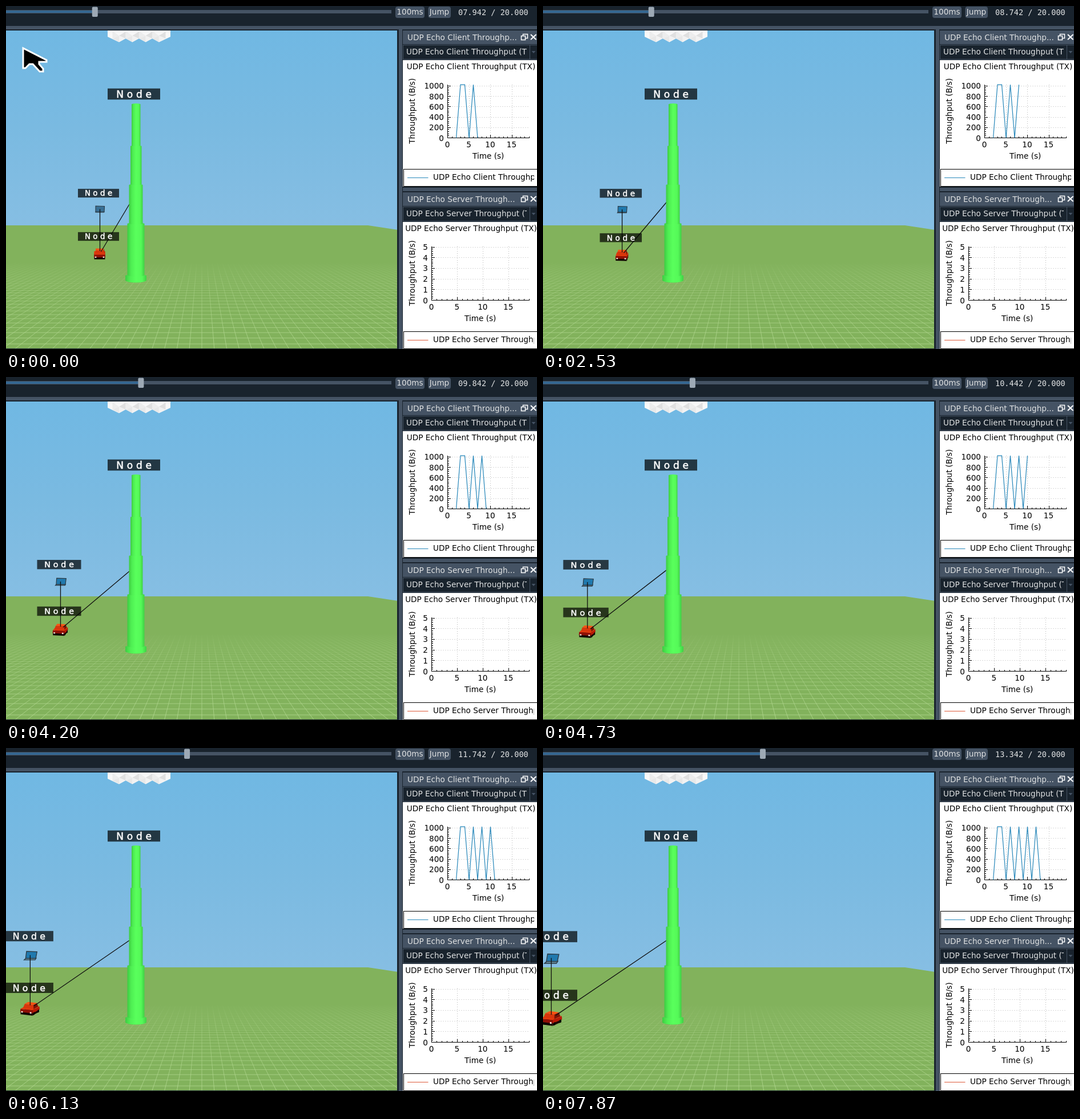
Write an HTML page with a canvas that moves like this. It is 930 px wide and 602 px high and loops after 8000 ms.

```html
<!DOCTYPE html>
<html lang="en">
<head>
<meta charset="utf-8">
<title>Network simulation playback</title>
<style>
html, body { margin: 0; width: 100%; height: 100%; overflow: hidden; background: #19232d; }
canvas { display: block; }
</style>
</head>
<body>
<canvas id="stage" width="930" height="602"></canvas>
<script>
const ctx = document.getElementById('stage').getContext('2d');
const LOOP = 8000, TICK = 200 / 3;
const DARK = '#19232d', SLATE = '#455364', PALE = '#dfe1e2';
const SANS = '13.6px "DejaVu Sans", sans-serif';
const MONO = '13.6px "DejaVu Sans Mono", monospace';

// Playback progress: [tick, tenths of a second simulated]
const PROGRESS = [[29, 0], [30, 1], [35, 6], [37, 7], [38, 8], [42, 9], [44, 10], [46, 11],
  [50, 12], [56, 16], [58, 17], [63, 19], [68, 23], [70, 24], [71, 25], [73, 26], [74, 27],
  [76, 28], [80, 30], [85, 35], [88, 36], [98, 41], [100, 42], [101, 43], [103, 44],
  [107, 47], [109, 48], [116, 54], [118, 54.6]];

// Vehicle path: tenths, label right, label width, x, laptop y, lower label y, car y, yaw, link y
const PATH = [
  [1, 198, 72, 164.5, 356.5, 404.5, 435, 0, 348],
  [12, 158.5, 74.5, 123.5, 357.5, 408, 439, 0.14, 343],
  [19, 131.5, 77, 95.5, 359, 411, 443.5, 0.22, 341],
  [30, 102.5, 81.5, 64.5, 361, 415.5, 450, 0.33, 338],
  [44, 70.5, 88, 28, 365.5, 425.5, 463.5, 0.48, 338],
  [54.6, 60, 92, 14.5, 368.5, 434, 474.5, 0.52, 338]];

function rect(x, y, w, h, color) {
  ctx.fillStyle = color;
  ctx.fillRect(x, y, w, h);
}

function poly(points, fill, stroke, width = 1) {
  ctx.beginPath();
  points.forEach(([x, y]) => ctx.lineTo(x, y));
  ctx.closePath();
  if (fill) { ctx.fillStyle = fill; ctx.fill(); }
  if (stroke) { ctx.strokeStyle = stroke; ctx.lineWidth = width; ctx.stroke(); }
}

function line(x1, y1, x2, y2, color, width = 1) {
  ctx.strokeStyle = color;
  ctx.lineWidth = width;
  ctx.beginPath();
  ctx.moveTo(x1, y1);
  ctx.lineTo(x2, y2);
  ctx.stroke();
}

function text(str, x, y, color, align = 'left', font = SANS) {
  ctx.font = font;
  ctx.fillStyle = color;
  ctx.textAlign = align;
  ctx.fillText(str, x, y);
}

function clipped(x, y, w, h, draw) {
  ctx.save();
  ctx.beginPath();
  ctx.rect(x, y, w, h);
  ctx.clip();
  draw();
  ctx.restore();
}

function progressAt(tick) {
  if (tick < 30) return 0;
  const i = PROGRESS.findIndex(p => p[0] > tick);
  if (i < 0) return PROGRESS[PROGRESS.length - 1][1];
  const [t0, a] = PROGRESS[i - 1], [t1, b] = PROGRESS[i];
  return b - a <= 1 ? a : a + (b - a) * (tick - t0) / (t1 - t0);
}

// Cubic Hermite through the path rows
function poseAt(u) {
  const last = PATH.length - 1;
  u = Math.min(Math.max(u, PATH[0][0]), PATH[last][0]);
  let i = 0;
  while (i < last - 1 && u > PATH[i + 1][0]) i++;
  const p = PATH[i], q = PATH[i + 1], span = q[0] - p[0], s = (u - p[0]) / span;
  const slope = (j, c) => {
    const a = PATH[Math.max(j - 1, 0)], b = PATH[Math.min(j + 1, last)];
    return (b[c] - a[c]) / (b[0] - a[0]);
  };
  const [, right, width, x, laptopY, labelY, carY, yaw, linkY] = p.map((v, c) =>
    v + (q[c] - v) * s * s * (3 - 2 * s)
    + span * s * (1 - s) * ((1 - s) * slope(i, c) - s * slope(i + 1, c)));
  return { right, width, x, laptopY, labelY, carY, yaw, linkY };
}

function drawGround() {
  const sky = ctx.createLinearGradient(0, 42, 0, 388);
  sky.addColorStop(0, '#70b8e3');
  sky.addColorStop(0.5, '#7abae1');
  sky.addColorStop(1, '#86bee3');
  rect(0, 42, 686, 560, sky);
  poly([[0, 385], [634, 385], [686, 393], [686, 602], [0, 602]], '#82b25c');

  const mesh = ctx.createLinearGradient(0, 450, 0, 602);
  mesh.addColorStop(0, 'rgba(176,214,142,0)');
  mesh.addColorStop(0.25, 'rgba(176,214,142,0.4)');
  mesh.addColorStop(1, 'rgba(176,214,142,0.85)');
  const vx = 343, vy = 345, focal = 485, cell = 0.085;
  for (let z = 1.87; z < 4.7; z += cell) line(0, vy + focal / z, 686, vy + focal / z, mesh);
  for (let k = -42; k <= 42; k++)
    line(vx + k * cell * 105, vy + 105, vx + k * cell * 257, vy + 257, mesh);
}

function drawCloud() {
  const rim = [[178, 42], [178, 54]];
  for (let i = 0; i < 4; i++) {
    const x = 198 + i * 23.3;
    rim.push([x, 63.5]);
    if (i < 3) rim.push([x + 11.6, 57]);
  }
  poly([...rim, [288, 54], [288, 42]], '#f8f8f8');
  for (let i = 0; i < 4; i++) {
    const x = 198 + i * 23.3;
    poly([[x - 11.6, 57], [x, 52], [x, 63]], '#e8e8e8');
    poly([[x, 52], [x + 11.6, 57], [x, 63]], '#f2f2f2');
    poly([[x - 11.6, 44], [x, 52], [x - 11.6, 57]], '#ededed');
    poly([[x, 52], [x + 11.6, 45], [x + 11.6, 57]], '#e0e0e0');
  }
}

function drawTower() {
  const part = (x1, x2, y1, y2, bow) => {
    const g = ctx.createLinearGradient(x1, 0, x2, 0);
    g.addColorStop(0, '#3ecb43');
    g.addColorStop(0.22, '#4eee52');
    g.addColorStop(0.5, '#59ff5c');
    g.addColorStop(0.8, '#55f958');
    g.addColorStop(1, '#40d045');
    const mid = (x1 + x2) / 2, r = (x2 - x1) / 2;
    ctx.fillStyle = g;
    ctx.beginPath();
    ctx.ellipse(mid, y1 + 1, r, 1.5, 0, Math.PI, 0);
    ctx.ellipse(mid, y2 - bow, r, bow, 0, 0, Math.PI);
    ctx.fill();
  };
  part(209, 246, 472, 485.5, 4.5);
  part(212.5, 242.5, 381, 475, 3);
  part(215.5, 239.5, 313, 383, 1);
  part(218, 237.5, 245, 314, 1);
  part(220, 235.5, 171.5, 246, 1);
}

function drawLabel(x, cy, w) {
  const h = w * 0.212, size = w * 0.185;
  const left = x + w * 0.165, base = cy + size * 0.37;
  rect(x, cy - h / 2, w, h, 'rgba(0,0,0,0.7)');
  ctx.letterSpacing = w * 0.063 + 'px';
  text('Node', left, base, '#fff', 'left', size + 'px "DejaVu Sans", sans-serif');
  ctx.strokeStyle = '#fff';
  ctx.lineWidth = 0.5;
  ctx.strokeText('Node', left, base);
  ctx.letterSpacing = '0px';
}

function drawLaptop(x, y, scale, yaw) {
  ctx.save();
  ctx.translate(x + yaw * 4, y);
  ctx.scale(scale, scale);
  const skew = yaw * 1.5, drop = 5.5 + yaw * 4;
  poly([[-7.5, 4.5], [7.5, 4.5], [7.5 - yaw * 4, drop], [-8 - yaw * 6, drop]],
    '#5f8395', '#26323a', 1);
  poly([[-7.5 + skew, -5.5], [8 + skew, -5], [7.5 - skew, 4.8], [-7.5 - skew, 4.5]],
    yaw < 0.05 ? '#386f94' : '#2079ae', '#2c3a44', 1.1);
  ctx.restore();
}

// Blocky car, seen from the front and turning to its right
function drawCar(x, y, scale, yaw) {
  const c = Math.cos(yaw), s = Math.sin(yaw);
  const at = ([a, l, h]) => [x + scale * (a * c - l * s),
    y + scale * ((a * s + l * c) * 0.25 - h + 6.5)];
  const face = (color, ...pts) => poly(pts.map(at), color);
  const block = (w, back, front, low, high, taper, top, nose, side) => {
    const t = w - taper, b = back + taper, f = front - taper * 2;
    face(side, [w, back, low], [w, front, low], [t, f, high], [t, b, high]);
    face(nose, [-w, front, low], [w, front, low], [t, f, high], [-t, f, high]);
    face(top, [-t, b, high], [t, b, high], [t, f, high], [-t, f, high]);
  };
  block(9.5, -12, 12.5, 0, 4, 0, '#120503', '#120503', '#1a0603');
  block(10, -13, 13, 3.5, 8, 0.3, '#e63a0c', '#8f1006', '#b81907');
  for (const l of [-8, 8])
    face('#0b0504', [10, l - 2.5, 0], [10, l + 2.5, 0], [10, l + 2.5, 4], [10, l - 2.5, 4]);
  block(8.5, -11, 6, 8, 13.5, 1.5, '#ff5012', '#d8360c', '#7c1406');
  for (const a of [-7, 7])
    face('#f3e6dd', [a - 1.3, 13, 2.8], [a + 1.3, 13, 2.8], [a + 1.3, 13, 5], [a - 1.3, 13, 5]);
}

function drawVehicle(p) {
  const scale = p.width / 72, left = p.right - p.width;
  drawCar(p.x - 0.5, p.carY, scale, p.yaw);
  drawLaptop(p.x, p.laptopY, scale, p.yaw);
  line(p.x, p.laptopY, p.x, p.carY - 5 * scale, '#101010', 1.3);
  line(p.x + 2 + p.yaw * 11, p.carY - 4 * scale, 216, p.linkY, '#101010', 1.3);
  drawLabel(left, 328.5 + (p.width - 72) * 0.13, p.width);
  drawLabel(left, p.labelY, p.width);
}

function drawCursor() {
  poly([[30, 74], [30, 109], [34, 109], [41, 102], [47, 102], [59, 115], [65, 115],
    [65, 110], [58, 102], [58, 98], [71, 98], [71, 95]], '#000', '#fff', 3);
}

function drawToolbar(sim) {
  rect(0, 0, 930, 43, DARK);
  rect(0, 35, 930, 6, SLATE);
  const x = 160 + (sim - 8.042) * 42.45;
  rect(0, 7, 675, 6, SLATE);
  rect(0, 8, x, 4, '#346792');
  const round = (x, y, w, h, r, color) => {
    ctx.fillStyle = color;
    ctx.beginPath();
    ctx.roundRect(x, y, w, h, r);
    ctx.fill();
  };
  round(x - 5, 1.5, 10, 17.5, 2, '#9da9b5');
  round(682, 1, 51, 20, 4, SLATE);
  round(739.5, 1, 39.5, 20, 4, SLATE);
  text('100ms', 707.5, 15, PALE, 'center');
  text('Jump', 759, 15, PALE, 'center');
  text(sim.toFixed(3).padStart(6, '0') + ' / 20.000', 792, 16, PALE, 'left', MONO);
}

function drawDock(name, y, bottom, legendY, color) {
  const title = `UDP Echo ${name} Through`;
  const full = title + 'put (TX)';
  rect(695, y, 235, 24, SLATE);
  text(title + (name === 'Client' ? 'p...' : '...'), 703, y + 17, PALE);
  ctx.strokeStyle = '#fff';
  ctx.lineWidth = 1.5;
  ctx.strokeRect(905.5, y + 6.5, 8, 7);
  rect(902, y + 9, 8, 8, SLATE);
  ctx.strokeRect(902.5, y + 9.5, 7, 7);
  line(919, y + 7, 928.5, y + 16, '#fff', 2);
  line(928.5, y + 7, 919, y + 16, '#fff', 2);

  rect(695, y + 24, 235, 28, DARK);
  ctx.strokeStyle = SLATE;
  ctx.lineWidth = 1;
  ctx.strokeRect(695.5, y + 25.5, 240, 25);
  line(917.5, y + 26, 917.5, y + 50, SLATE);
  clipped(696, y + 24, 216, 28, () => text(full, 701, y + 42, PALE));
  poly([[920.5, y + 36], [927.5, y + 36], [924, y + 40]], SLATE);

  rect(695, y + 52, 235, bottom - y - 52, '#fff');
  text(full, 814.5, y + 68, '#000', 'center');
  ctx.strokeStyle = '#000';
  ctx.lineWidth = 1;
  ctx.strokeRect(696.5, legendY, 240, 30);
  line(703, legendY + 15, 739.5, legendY + 15, color, 1.2);
  clipped(740, legendY, 185, 29, () => text(full, 748, legendY + 18.5, '#000'));
}

// Axes with inward ticks and dotted grid; returns a point mapper
function drawAxes({ x0, y0, top, perX, perY, stepY, rows, minor }) {
  const px = v => x0 + v * perX, py = v => y0 - v * perY;
  const snap = v => Math.floor(v) + 0.5;
  const right = 917;
  ctx.setLineDash([1, 3]);
  for (let v = 5; v <= 15; v += 5) line(snap(px(v)), top, snap(px(v)), y0, '#b4b4b4');
  for (let i = 1; i <= rows; i++) line(x0, snap(py(i * stepY)), right, snap(py(i * stepY)), '#b4b4b4');
  ctx.setLineDash([]);
  line(x0, top, x0, y0 + 0.5, '#000');
  line(x0, y0, right, y0, '#000');
  for (let s = 0; s <= 19; s++) {
    const x = snap(px(s));
    line(x, y0, x, y0 - (s % 5 ? 2.5 : 5.5), '#000');
    if (s % 5 === 0) text(String(s), px(s) - 0.5, y0 + 16, '#000', 'center');
  }
  for (let i = 0; i <= rows * minor; i++) {
    const v = i * stepY / minor, y = snap(py(v));
    line(x0, y, x0 + (i % minor ? 2.5 : 5.5), y, '#000');
    if (i % minor === 0) text(String(v), x0 - 6.5, py(v) + 5, '#000', 'right');
  }
  text('Time (s)', (x0 + right) / 2 - 0.5, y0 + 36.5, '#000', 'center');
  ctx.save();
  ctx.translate(716, (top + y0) / 2 - 0.5);
  ctx.rotate(-Math.PI / 2);
  text('Throughput (B/s)', 0, 0, '#000', 'center');
  ctx.restore();
  return v => [px(v[0]), py(v[1])];
}

function drawPanels(sim) {
  rect(685, 42, 245, 560, DARK);
  rect(0, 601, 686, 1, DARK);
  rect(688, 41, 6, 561, SLATE);
  rect(695, 319, 235, 6, SLATE);

  drawDock('Client', 43, 317, 286.5, '#2586b9');
  const point = drawAxes({ x0: 773.5, y0: 231.5, top: 138, perX: 7.5, perY: 0.0912, stepY: 200, rows: 5, minor: 5 });
  // Samples land slightly ahead of the clock as the run goes on
  const seconds = Math.floor(sim + 0.02 * (sim - 8));
  ctx.strokeStyle = '#2586b9';
  ctx.lineWidth = 1.2;
  ctx.beginPath();
  for (let s = 2; s <= seconds; s++) {
    const busy = s === 3 || (s > 3 && s % 2 === 0);
    ctx.lineTo(...point([s, busy ? 1024 : 0]));
  }
  ctx.stroke();

  drawDock('Server', 327, 602, 571.5, '#dd5a38');
  drawAxes({ x0: 745.5, y0: 516.5, top: 422, perX: 8.98, perY: 18.7, stepY: 1, rows: 5, minor: 5 });
}

function draw(ms) {
  const tick = Math.floor((ms + 4) / TICK);
  const tenths = progressAt(tick);
  const sim = 7.942 + Math.floor(tenths + 1e-6) / 10;
  clipped(0, 43, 685, 558, () => {
    drawGround();
    drawCloud();
    drawVehicle(poseAt(tenths));
    drawTower();
    drawLabel(178, 154.5, 92);
    if (tick < 1) drawCursor();
  });
  drawToolbar(sim);
  drawPanels(sim);
}

const start = performance.now();
function loop() {
  draw((performance.now() - start) % LOOP);
  requestAnimationFrame(loop);
}
loop();
</script>
</body>
</html>
```
